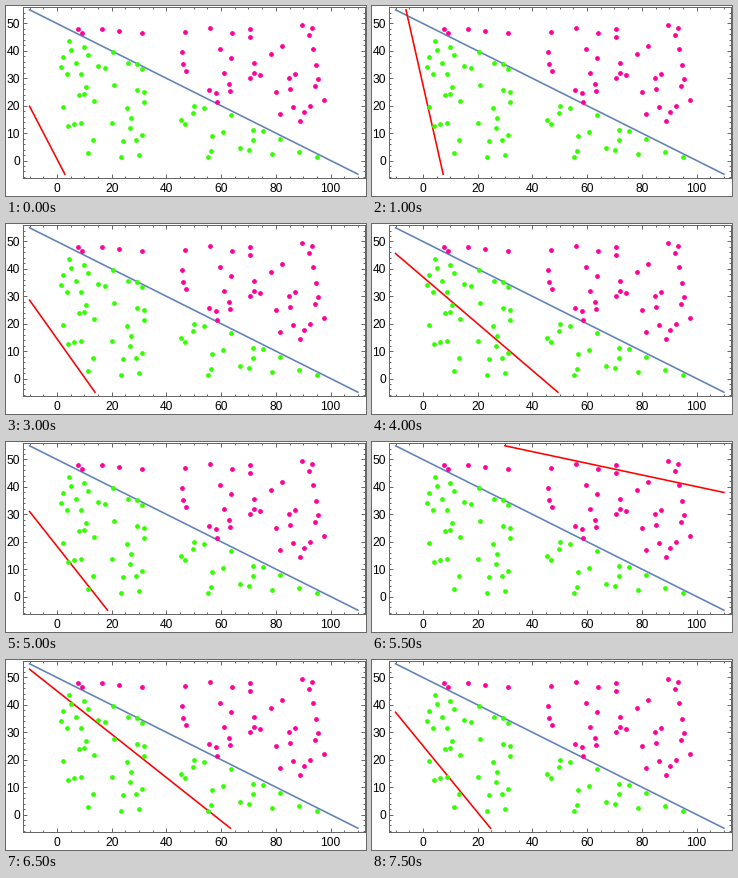
A matplotlib script that plays this animation: 360 by 190 pixels, repeating every 8000 ms.

```python
"""Perceptron training: the red boundary searches for the blue separator."""
import colorsys

import matplotlib.pyplot as plt
import numpy as np
from matplotlib.animation import FuncAnimation
from matplotlib.ticker import MultipleLocator

W, H, DPI = 360, 190, 100
PX = 72 / DPI  # points per pixel
STEPS, STEP_MS = 16, 500
X_MIN, X_MAX, Y_MIN, Y_MAX = -10, 110, -5, 55

GREEN = colorsys.hsv_to_rgb(0.3, 1, 1)
PINK = colorsys.hsv_to_rgb(0.9, 1, 1)
BLUE = "#5e81b5"
INK = "#666666"

# Sweeps of the boundary: first step, length, first pose, last pose.
# A pose is the height at X_MIN and the x where the line meets Y_MIN.
SWEEPS = [
    (0, 3, (19.8, 2.9), (71.8, 7.4)),
    (4, 1, (37.0, 19.4), (37.0, 19.4)),
    (6, 3, (28.6, 13.9), (45.6, 49.3)),
    (10, 1, (31.0, 18.5), (31.0, 18.5)),
    (11, 2, (63.5, 312), (54.3, 294)),
    (13, 3, (53.0, 63.4), (37.3, 24.7)),
]


def separator(x):
    return 50 - x / 2


def sample(rng, count, x_range, above, gap=2):
    """Random points on one side of the separator, kept apart by a gap."""
    points = []
    while len(points) < count:
        p = np.array([rng.uniform(*x_range), rng.uniform(1, 50)])
        clear = all(np.hypot(*(p - q)) > gap for q in points)
        if clear and (p[1] > separator(p[0])) == above:
            points.append(p)
    return points


def boundary(step):
    """End points of the boundary, cut to the plotted range."""
    for first, count, a, b in SWEEPS:
        if first <= step < first + count:
            break
    else:
        return [], []
    t = (step - first) / max(count - 1, 1)
    left, foot = np.array(a) ** (1 - t) * np.array(b) ** t
    slope = (Y_MIN - left) / (foot - X_MIN)
    top = min(left, Y_MAX)
    start = X_MIN + (top - left) / slope
    end = min(foot, X_MAX)
    return [start, end], [top, left + slope * (end - X_MIN)]


fig = plt.figure(figsize=(W / DPI, H / DPI), dpi=DPI, facecolor="white")
x0, x1, y0, y1 = 17, 358.5, 0.5, 171.5
ax = fig.add_axes([x0 / W, 1 - y1 / H, (x1 - x0) / W, (y1 - y0) / H])
ax.set_xlim(X_MIN - 2.4, X_MAX + 2.4)
ax.set_ylim(Y_MIN - 1.2, Y_MAX + 1.2)

for axis, major, minor in ((ax.xaxis, 20, 5), (ax.yaxis, 10, 2)):
    axis.set_major_locator(MultipleLocator(major))
    axis.set_minor_locator(MultipleLocator(minor))
for kind, size in (("major", 4), ("minor", 2.4)):
    ax.tick_params(which=kind, direction="in", top=True, right=True,
                   length=size * PX, width=PX, color=INK, labelcolor="black",
                   labelsize=12 * PX, labelfontfamily="Liberation Sans")
ax.tick_params(axis="x", pad=6 * PX)
ax.tick_params(axis="y", pad=3 * PX)
for spine in ax.spines.values():
    spine.set(linewidth=PX, color=INK)

rng = np.random.default_rng(4)
near, far = (1, 32), (42, 99)
for color, above, n_near, n_far in ((PINK, True, 5, 39),
                                    (GREEN, False, 38, 19)):
    dots = sample(rng, n_near, near, above) + sample(rng, n_far, far, above)
    ax.plot(*np.transpose(dots), "o", ms=4.8 * PX, mew=0, color=color,
            zorder=4)

style = dict(lw=1.6 * PX, solid_capstyle="projecting")
ends = np.array([X_MIN, X_MAX])
ax.plot(ends, separator(ends), color=BLUE, zorder=2.5, **style)
guess, = ax.plot([], [], color="red", zorder=3, **style)


def draw(i):
    guess.set_data(*boundary(i))
    return guess,


anim = FuncAnimation(fig, draw, frames=STEPS, interval=STEP_MS,
                     repeat=True, repeat_delay=0)
plt.show()
```
